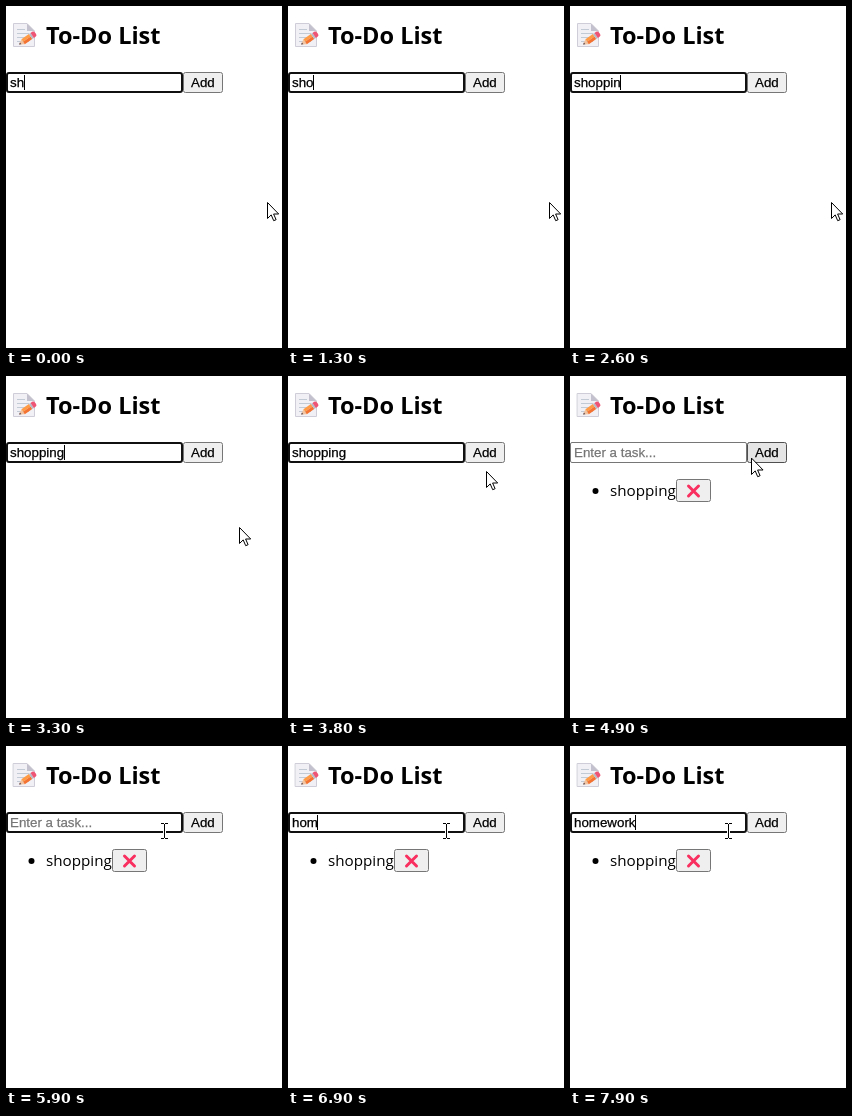
These frames come from a looping animation (276x342 px, 8000 ms). An HTML page with a canvas:

```html
<!DOCTYPE html>
<html lang="en">
<head>
<meta charset="utf-8">
<title>To-Do List</title>
<style>
  html, body { margin: 0; width: 100%; height: 100%; overflow: hidden; background: #fff; }
  canvas { display: block; width: 276px; height: 342px; }
</style>
</head>
<body>
<canvas id="stage" width="276" height="342"></canvas>
<script>
const ctx = document.getElementById('stage').getContext('2d');
const LOOP = 8000, STEP = 100, BLINK = 500;
const BLUR = 4300, SUBMIT = 4400, FOCUS = 5200;
const UI = '"Open Sans", "Noto Sans", sans-serif';
const FORM = '13.333px "Liberation Sans", Arial, sans-serif';

const firstWord = { word: 'shopping', start: 1100, pace: 360, ready: 2 };
const secondWord = { word: 'homework', start: 6500, pace: 200, ready: 0 };

const home = { x: 261, y: 196 };
const glides = [
  { start: 3000, end: 3800, x: 198, y: 95 },
  { start: 3800, end: 4100, x: 181, y: 82 },
  { start: 4900, end: FOCUS, x: 158, y: 85 }
];

const easeOut = u => 1 - (1 - u) ** 1.25;
const clamp = (v, lo, hi) => Math.min(hi, Math.max(lo, v));

function pointerAt(t) {
  let { x, y } = home;
  for (const g of glides) {
    const k = easeOut(clamp((t - g.start) / (g.end - g.start), 0, 1));
    x += (g.x - x) * k;
    y += (g.y - y) * k;
  }
  return [Math.round(x), Math.round(y)];
}

// Typed part of a word and the time since the caret last restarted
function typed({ word, start, pace, ready }, t, focusTime) {
  const keys = clamp(Math.floor((t - start) / pace) + 1, 0, word.length - ready);
  const since = keys ? start + (keys - 1) * pace : focusTime;
  return { value: word.slice(0, ready + keys), idle: t - since };
}

function text(str, x, y, font, color = '#000', weight = 0) {
  ctx.font = font;
  ctx.fillStyle = ctx.strokeStyle = color;
  ctx.fillText(str, x, y);
  if (weight) {
    ctx.lineWidth = weight;
    ctx.strokeText(str, x, y);
  }
}

const formText = (str, x, color) => text(str, x, 81, FORM, color, 0.25);

function box(x, y, w, h, r, fill, stroke, line = 1) {
  ctx.beginPath();
  ctx.roundRect(x + line / 2, y + line / 2, w - line, h - line, r);
  ctx.fillStyle = fill;
  ctx.fill();
  ctx.strokeStyle = stroke;
  ctx.lineWidth = line;
  ctx.stroke();
}

function shape(path, fill, stroke) {
  const p = new Path2D(path);
  ctx.fillStyle = fill;
  ctx.fill(p);
  if (stroke) {
    ctx.strokeStyle = stroke;
    ctx.lineWidth = 1;
    ctx.stroke(p);
  }
}

function line(path, color, width, cap = 'butt') {
  ctx.strokeStyle = color;
  ctx.lineWidth = width;
  ctx.lineCap = cap;
  ctx.stroke(new Path2D(path));
}

function at(x, y, paint, angle = 0) {
  ctx.save();
  ctx.translate(x, y);
  ctx.rotate(angle);
  paint();
  ctx.restore();
}

function pencil() {
  shape('M0 0L5 -3V3Z', '#f2c5a0');
  shape('M0 0L2 -1.2V1.2Z', '#54424f');
  shape('M5 -3h9v3h-9Z', '#ff9b45');
  shape('M5 0h9v3h-9Z', '#f47331');
  shape('M14 -3h2v6h-2Z', '#b8bac5');
  shape('M16 -3h2q2 0 2 2v2q0 2 -2 2h-2Z', '#ef5474');
}

function memoIcon() {
  shape('M7.5 17.5H21L28.5 25V40.5H7.5Z', '#f1f0f5', '#cfced8');
  shape('M21 17.5L28.5 25H21Z', '#c3c1cd');
  for (let i = 0; i < 4; i++) line(`M11 ${23.5 + i * 4}h${i ? 12 : 8}`, '#c2cad6', 1);
  at(13, 38.5, pencil, -0.6);
}

function arrow(x, y) {
  at(x + 0.5, y + 0.5, () =>
    shape('M0 0V16L3.7 12.4L6.2 18.2L8.6 17.2L6.1 11.5H11.2Z', '#fff', '#000'));
}

function beam(x, y) {
  const path = 'M-3.5 -7.5h3m1 0h3M0 -7V7M-3.5 7.5h3m1 0h3';
  at(x + 0.5, y, () => {
    line(path, '#fff', 3);
    line(path, '#000', 1);
  });
}

function field(t) {
  const focused = t < BLUR || t >= FOCUS;
  if (focused) box(0, 66, 177, 21, 2, '#fff', '#101010', 2);
  else box(0, 66, 177, 21, 1.5, '#fff', '#767676');

  const { value, idle } = t < SUBMIT ? typed(firstWord, t, 0) : typed(secondWord, t, FOCUS);
  if (value) formText(value, 4);
  else formText('Enter a task...', 4, '#757575');

  if (focused && Math.floor(idle / BLINK) % 2 === 0) {
    ctx.fillStyle = '#000';
    ctx.fillRect(Math.floor(4 + ctx.measureText(value).width), 69, 1, 15);
  }
}

function task() {
  ctx.fillStyle = '#000';
  ctx.beginPath();
  ctx.arc(25.5, 115, 3, 0, Math.PI * 2);
  ctx.fill();
  text('shopping', 40, 120, '15.2px ' + UI);
  box(106, 103, 35, 23, 2, '#efefef', '#767676');
  line('M118.5 110l10 10m0 -10l-10 10', '#f92f60', 3, 'round');
}

function draw(t) {
  ctx.fillStyle = '#fff';
  ctx.fillRect(0, 0, 276, 342);
  memoIcon();
  text('To-Do List', 40, 38, 'bold 23.5px ' + UI);
  field(t);

  const [x, y] = pointerAt(t);
  const inRow = y >= 66 && y < 87;
  const hover = inRow && x >= 177 && x < 217;
  box(177, 66, 40, 21, 2, hover ? '#e5e5e5' : '#efefef', hover ? '#4f4f4f' : '#767676');
  formText('Add', 185);
  if (t >= SUBMIT) task();
  if (inRow && x < 177) beam(x, y);
  else arrow(x, y);
}

function tick(now) {
  draw(Math.floor((now % LOOP) / STEP) * STEP);
  requestAnimationFrame(tick);
}
requestAnimationFrame(tick);
</script>
</body>
</html>
```
